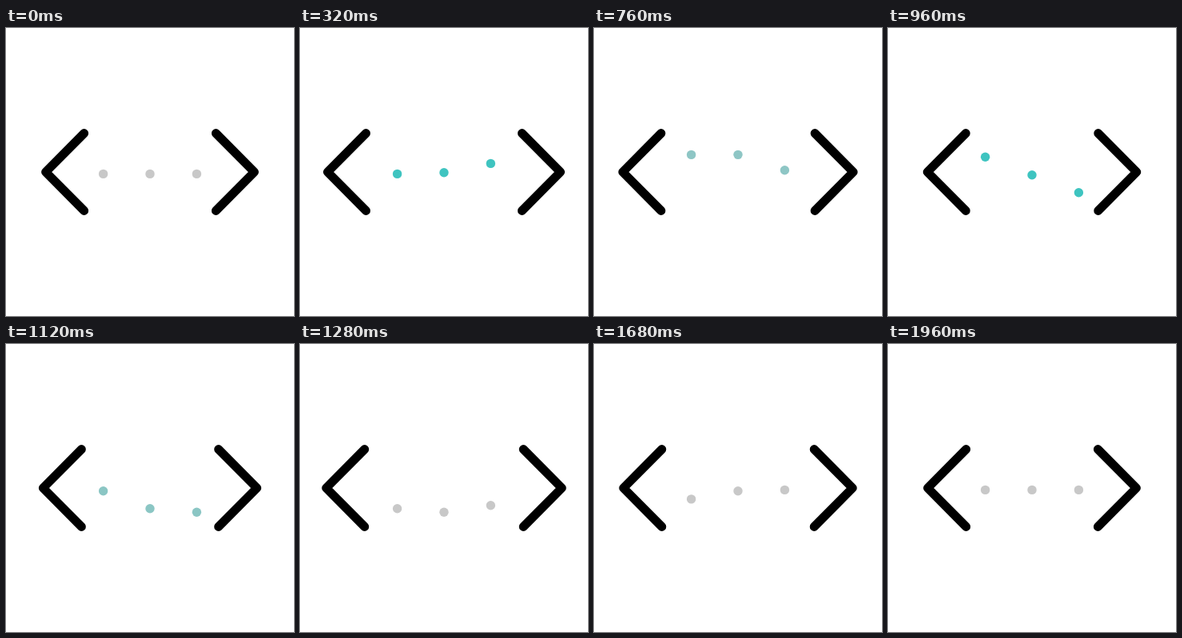
Write an HTML page that moves like this. It is 360x360 px and loops after 2 s.

```html
<!DOCTYPE html>
<html lang="en">
<head>
<meta charset="utf-8">
<title>Bouncing dots between brackets</title>
<style>
  html, body { margin: 0; width: 100%; height: 100%; overflow: hidden; background: #fff; }
  svg { display: block; width: 100vw; height: 100vh; }
  polyline { fill: none; stroke: #000; stroke-width: 11; stroke-linecap: round; stroke-linejoin: round; }
</style>
</head>
<body>
<svg viewBox="0 0 360 360">
  <polyline id="left" points="97.6,131.6 49.6,180 97.6,228.4"/>
  <polyline id="right" points="262.4,131.6 310.4,180 262.4,228.4"/>
  <g id="dots">
    <circle cx="121.6" r="5.7"/>
    <circle cx="180" r="5.7"/>
    <circle cx="238.4" r="5.7"/>
  </g>
</svg>
<script>
  const LOOP = 2000, STEP = 40, DELAY = 160, REST_Y = 182.4;
  const GRAY = [200, 200, 200], TEAL = [62, 196, 192];

  // Each key is [time in ms, value].
  const spread = [[20, 0], [550, 24.5], [1000, 0], [1460, 24.5], [1490, 24.5], [1880, 0]];
  const tint = [[0, 0], [340, 1], [600, 0], [950, 1], [1270, 0]];
  const bounce = [
    [60, 0], [160, -1.7], [320, -13], [440, -24], [520, -26.3], [640, -21.2], [800, 1.3],
    [960, 23.3], [1100, 28], [1280, 19.4], [1360, 11.5], [1520, 1.3], [1620, 0]
  ];

  const left = document.getElementById('left');
  const right = document.getElementById('right');
  const dots = [...document.querySelectorAll('circle')];

  function ease(x) {
    const a = x ** 1.8, b = (1 - x) ** 1.8;
    return a / (a + b);
  }

  // Finds the segment around t and blends it; outside the keys the end values hold.
  function sample(keys, t, blend) {
    const last = keys.length - 1;
    if (t <= keys[0][0]) return keys[0][1];
    if (t >= keys[last][0]) return keys[last][1];
    const i = keys.findIndex(k => k[0] > t) - 1;
    return blend(keys, i, (t - keys[i][0]) / (keys[i + 1][0] - keys[i][0]));
  }

  function eased(keys, i, u) {
    return keys[i][1] + (keys[i + 1][1] - keys[i][1]) * ease(u);
  }

  function tangent(keys, i) {
    if (i === 0 || i === keys.length - 1) return 0;
    const [[t0, v0], [t1, v1], [t2, v2]] = keys.slice(i - 1, i + 2);
    const before = t1 - t0, after = t2 - t1;
    return ((v1 - v0) / before * after + (v2 - v1) / after * before) / (before + after);
  }

  function curved(keys, i, u) {
    const span = keys[i + 1][0] - keys[i][0];
    const s = u * u * (3 - 2 * u);
    return keys[i][1] * (1 - s) + keys[i + 1][1] * s
      + span * u * (1 - u) * ((1 - u) * tangent(keys, i) - u * tangent(keys, i + 1));
  }

  function draw(t) {
    const dx = sample(spread, t, eased);
    left.setAttribute('transform', `translate(${-dx} 0)`);
    right.setAttribute('transform', `translate(${dx} 0)`);

    const mix = sample(tint, t, eased);
    const rgb = GRAY.map((c, i) => Math.round(c + (TEAL[i] - c) * mix));
    dots.forEach((dot, i) => {
      const y = REST_Y + sample(bounce, t - (2 - i) * DELAY, curved);
      dot.setAttribute('cy', y);
      dot.setAttribute('fill', `rgb(${rgb})`);
    });
  }

  const start = performance.now();
  function tick() {
    const t = Math.floor((performance.now() - start) % LOOP / STEP) * STEP;
    draw(t < 2 * STEP ? 0 : t);
    requestAnimationFrame(tick);
  }
  tick();
</script>
</body>
</html>
```
